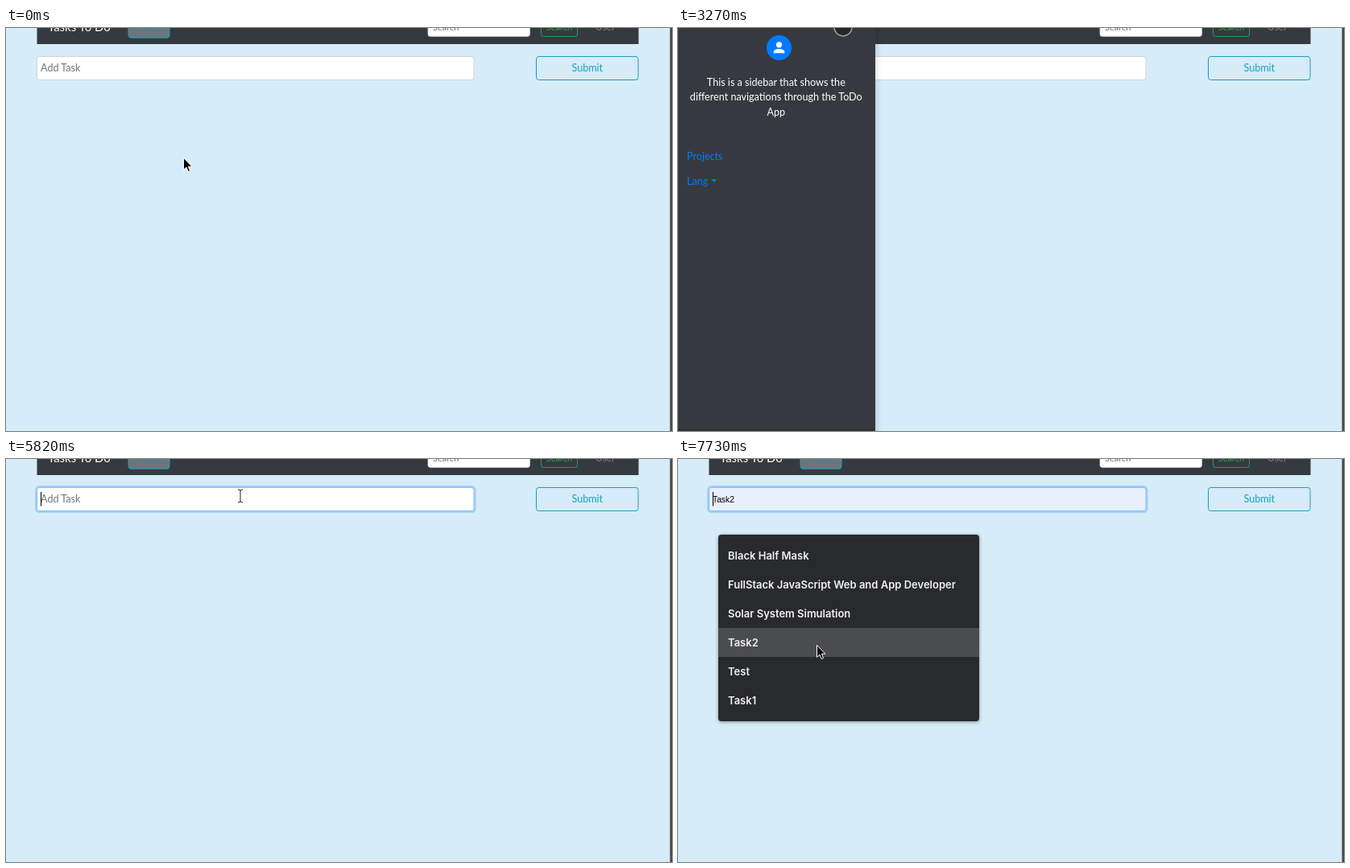
Recreate the animation shown at these times as an HTML page. Size 827x501 px, loop 8000 ms.

```html
<!DOCTYPE html>
<html lang="en">
<head>
<meta charset="utf-8">
<title>Tasks To Do</title>
<style>
  html, body { margin: 0; width: 100%; height: 100%; overflow: hidden; background: #d6ecf8; }
  svg { display: block; width: 827px; height: 501px; }
  text { font: 12.6px Lato, sans-serif; }
  .mid { text-anchor: middle; }
  .small { font-size: 11px; }
  #value { font: 10.3px "Liberation Sans", Arial, sans-serif; }
  #list text { font: 600 13px Inter, sans-serif; fill: #f1f1f2; }
  #list { filter: drop-shadow(0 1px 2px rgba(0, 0, 0, .4)); }
  #side { filter: drop-shadow(2px 0 3px rgba(0, 0, 0, .14)); }
  #menu rect { fill: #6c757d; stroke: #17a2b8; }
  #menu text { fill: #2b8c9d; }
  #menu .ring { fill: none; stroke: none; }
  #menu.on rect { fill: #17a2b8; }
  #menu.on text { fill: #fff; }
  #menu.on .ring { fill: none; stroke: #17a2b8; stroke-opacity: .5; stroke-width: 2.5; }
</style>
</head>
<body>
<svg viewBox="0 0 827 501">
  <rect width="827" height="501" fill="#d6ecf8"/>
  <rect x="824.5" width="2.5" height="501" fill="#46474b"/>

  <rect x="38.5" y="-20" width="747" height="40" fill="#343a40"/>
  <text x="52" y="4" fill="#fff" style="font-size:15px">Tasks To Do</text>
  <g id="menu">
    <rect class="ring" x="150.7" y="-20" width="53.8" height="33.2" rx="4"/>
    <rect x="152" y="-20" width="51" height="32.2" rx="3"/>
    <text class="mid" x="177.5" y="2.8">Menu</text>
  </g>
  <rect x="524" y="-20" width="126.5" height="30.5" rx="3" fill="#fff" stroke="#ced4da" stroke-width=".8"/>
  <text class="small" x="530" y="2.6" fill="#6c757d">Search</text>
  <rect x="664.5" y="-20" width="45" height="30.5" rx="3" fill="none" stroke="#28a745" stroke-width=".9"/>
  <text class="small mid" x="687" y="2.6" fill="#28a745">Search</text>
  <text x="732" y="3" fill="#7b8085" style="font-size:12px">User</text>

  <rect id="glow" x="37.3" y="34.3" width="545" height="31.4" rx="4" fill="none" stroke="#80bdff" stroke-opacity=".6" stroke-width="2.4"/>
  <rect id="field" x="38.5" y="35.5" width="542.5" height="29" rx="3"/>
  <text id="hint" x="43" y="54" fill="#6c757d">Add Task</text>
  <text id="value" x="43" y="53.8"></text>
  <path id="caret" d="M43.5 41V58.5" stroke="#000"/>
  <rect x="658.5" y="35.5" width="126.5" height="29" rx="3" fill="none" stroke="#17a2b8"/>
  <text class="mid" x="721.8" y="54" fill="#17a2b8">Submit</text>

  <g id="list">
    <rect x="50" y="94" width="324" height="232" rx="4" fill="#292a2e"/>
    <rect id="hover" x="50" width="324" height="36" fill="#4b4c4f"/>
  </g>

  <g id="side">
    <rect x="-20" y="-10" width="265" height="521" fill="#363a40"/>
    <rect x="-20" y="498" width="265" height="3" fill="#303338"/>
    <rect id="close" x="213" y="-20" width="20.5" height="20.8" rx="2" fill="#c9cbcd"/>
    <circle cx="125.5" cy="24.5" r="15.5" fill="#007bff"/>
    <circle cx="125.5" cy="20.8" r="3.6" fill="#fff"/>
    <path d="M118.7 31.2V29.6C118.7 24.7 132.3 24.7 132.3 29.6V31.2Z" fill="#fff"/>
    <g class="mid" fill="#fff">
      <text x="121.8" y="71.8">This is a sidebar that shows the</text>
      <text x="121.8" y="90.4">different navigations through the ToDo</text>
      <text x="121.8" y="109">App</text>
    </g>
    <g fill="#007bff">
      <text x="11" y="164.4">Projects</text>
      <text x="11" y="194.8">Lang</text>
      <path d="M41 188H48.4L44.7 191.8Z"/>
    </g>
  </g>

  <path id="arrow" d="M0 0V14.8L3.4 11.6L5.8 17L8.1 16L5.8 10.7H10.4Z" fill="#000" stroke="#fff" stroke-width="1"/>
  <path id="beam" d="M-3-8Q0-8 0-6Q0-8 3-8M0-6V6M-3 8Q0 8 0 6Q0 8 3 8" fill="none" stroke="#222"/>
  <circle id="dot" r="11" fill="#1e1e1e" fill-opacity=".7" stroke="#9b9d9f" stroke-width="1.6"/>
</svg>
<script>
const LOOP = 8000;
const $ = id => document.getElementById(id);
const items = ['Black Half Mask', 'FullStack JavaScript Web and App Developer',
  'Solar System Simulation', 'Task2', 'Test', 'Task1'];

// time, pointer shape, x, y
const pointer = [
  [0, 'arrow', 220.5, 161.5], [130, 'arrow', 228, 172],
  [430, 'arrow', 390, 105], [580, 'arrow', 403, 79.5],
  [1030, 'arrow', 408, 79], [1180, 'beam', 322, 48],
  [1330, 'arrow', 206, 14], [1480, 'dot', 166, 0],
  [2080, 'dot', 168.5, -2.5], [2230, 'dot', 172.5, 0],
  [3270, 'dot', 205, -1], [3420, 'dot', 236, -4.5],
  [3720, 'dot', 232, -9], [3870, 'dot', 228, -13],
  [4470, 'dot', 227, -11], [4770, 'dot', 231, -11],
  [5070, 'dot', 236, -8], [5220, 'arrow', 252, 16],
  [5370, 'beam', 280, 43], [5520, 'beam', 291, 46],
  [6270, 'arrow', 272, 80], [6420, 'arrow', 240, 114],
  [6570, 'arrow', 229, 127], [6700, 'arrow', 226, 131.5],
  [6850, 'arrow', 210, 160], [6990, 'arrow', 189, 196],
  [7140, 'arrow', 176, 228], [7440, 'arrow', 172, 250],
  [7590, 'arrow', 172, 254], [7730, 'arrow', 172.5, 231.5]
];

// time, sidebar offset
const slide = [[0, -280], [2670, -76], [2820, 0], [4470, -140], [4620, -280]];

const at = (steps, t) => steps.findLast(s => s[0] <= t);
const show = (id, on) => { $(id).style.display = on ? '' : 'none'; };
const move = (id, x, y) => $(id).setAttribute('transform', `translate(${x} ${y})`);

items.forEach((name, i) => {
  const label = document.createElementNS('http://www.w3.org/2000/svg', 'text');
  label.setAttribute('x', 62);
  label.setAttribute('y', 125 + 36 * i);
  label.textContent = name;
  $('list').append(label);
});

function draw(t) {
  const [, shape, x, y] = at(pointer, t);
  for (const id of ['arrow', 'beam', 'dot']) show(id, id === shape);
  move(shape, x, y);

  const offset = at(slide, t)[1];
  show('side', offset > -280);
  move('side', offset, 0);
  show('close', t >= 4320);
  $('menu').classList.toggle('on', t >= 2520 && t < 4470);

  const focus = t >= 5820, open = t >= 5970;
  const row = open ? Math.floor((y - 102) / 36) : -1;
  const picked = row >= 0;
  show('glow', focus);
  show('caret', focus);
  show('list', open);
  show('hover', picked);
  show('hint', !picked);
  $('hover').setAttribute('y', 102 + 36 * row);
  $('value').textContent = picked ? items[row] : '';
  $('field').setAttribute('fill', picked ? '#e8f0fe' : '#fff');
  $('field').setAttribute('stroke', focus ? '#80bdff' : '#ced4da');
}

function tick() {
  draw(performance.now() % LOOP);
  requestAnimationFrame(tick);
}
tick();
</script>
</body>
</html>
```
